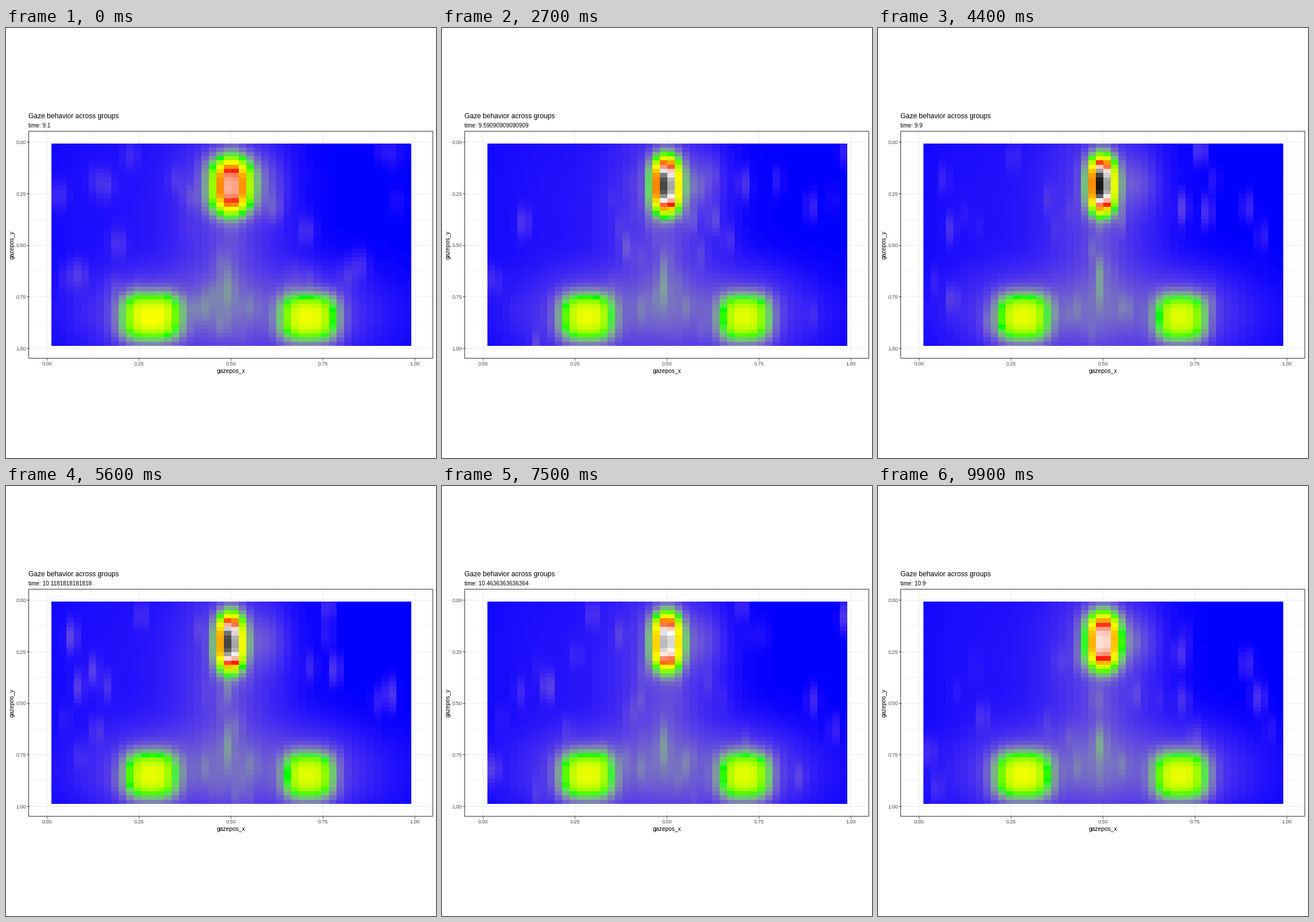
Write a matplotlib script that moves like this. It is 748 px wide and 748 px high and loops after 10 s.

```python
import numpy as np
import matplotlib.pyplot as plt
from matplotlib.animation import FuncAnimation
from matplotlib.patches import Rectangle

SIZE, DPI, FRAMES = 748, 100, 100
PX = 72 / DPI
N = 48
LEFT, RIGHT, TOP, BOTTOM = 79, 705, 201, 553
CELL = (RIGHT - LEFT) / N
START, SPAN = 9.1, 1.8

plt.rcParams["font.family"] = "Liberation Sans"

# ---- colour scale: blends in Lab space between evenly spaced stops ----
M = np.array([[0.4124, 0.3576, 0.1805],
              [0.2126, 0.7152, 0.0722],
              [0.0193, 0.1192, 0.9505]])
WHITE = M.sum(axis=1)


def to_lab(rgb):
    rgb = np.asarray(rgb, float)
    lin = np.where(rgb > 0.04045, ((rgb + 0.055) / 1.055) ** 2.4, rgb / 12.92)
    t = lin @ M.T / WHITE
    f = np.where(t > 0.008856, np.cbrt(t), 7.787 * t + 16 / 116)
    return np.stack([116 * f[:, 1] - 16, 500 * (f[:, 0] - f[:, 1]),
                     200 * (f[:, 1] - f[:, 2])], axis=1)


def to_rgb(lab):
    fy = (lab[:, 0] + 16) / 116
    f = np.stack([fy + lab[:, 1] / 500, fy, fy - lab[:, 2] / 200], axis=1)
    t = np.where(f > 0.2069, f ** 3, (f - 16 / 116) / 7.787)
    lin = np.clip((t * WHITE) @ np.linalg.inv(M).T, 0, 1)
    return np.where(lin > 0.0031308, 1.055 * lin ** (1 / 2.4) - 0.055, 12.92 * lin)


stops = to_lab([(0, 0, 1), (0, 1, 0), (1, 1, 0), (1, 0, 0), (1, 1, 1), (0, 0, 0)])
ramp = np.linspace(0, 5, 2001)
LUT = np.clip(to_rgb(np.stack([np.interp(ramp, range(6), c) for c in stops.T],
                              axis=1)), 0, 1)


def colorize(field):
    return LUT[np.rint(np.clip(field, 0, 1) * 2000).astype(int)]


# ---- density field ----
X, Y = np.meshgrid(LEFT + (np.arange(N) + 0.5) * CELL,
                   TOP + (np.arange(N) + 0.5) * (BOTTOM - TOP) / N)


def bump(x, y, sx, sy, amp):
    return amp * np.exp(-((X - x) / sx) ** 2 / 2 - ((Y - y) / sy) ** 2 / 2)


def plateau(x, y, wx, wy, amp):
    return amp * np.exp(-np.abs((X - x) / wx) ** 3 - np.abs((Y - y) / wy) ** 3)


# broad haze: left side, middle column, lower band, halos of the two lower areas
BASE = (bump(200, 300, 100, 150, 0.004) + bump(385, 330, 60, 130, 0.028)
        + bump(385, 500, 140, 48, 0.033) + bump(385, 475, 38, 38, 0.018)
        + bump(392, 390, 18, 80, 0.012) + bump(252, 495, 55, 42, 0.025)
        + bump(524, 495, 55, 42, 0.025) + bump(450, 270, 22, 30, 0.03))
# lasting ridges between the three areas
RIDGES = [(385, 450, 25, 0.045), (346, 490, 18, 0.025),
          (425, 485, 16, 0.025), (425, 270, 20, 0.02)]

# kernel width and peak over the run, as fractions of its span
PHASE = [0, 0.1, 0.27, 0.44, 0.57, 0.76, 1]
SPREAD = [1.72, 1.46, 1.2, 1.12, 1.14, 1.2, 1.4]
PEAK = [0.71, 0.80, 0.95, 1.0, 0.96, 0.88, 0.78]

# brief specks: denser on the left, in the middle and low down
rng = np.random.default_rng(7)
SPECKS = 150
speck_x = np.where(rng.random(SPECKS) < 0.4, rng.normal(385, 75, SPECKS),
                   LEFT + (RIGHT - LEFT) * rng.random(SPECKS) ** 1.2)
speck_y = rng.uniform(TOP, BOTTOM, SPECKS)
speck_t = rng.uniform(-0.1, 1.1, SPECKS)
speck_amp = rng.uniform(0.012, 0.035, SPECKS)


def density(u):
    spread, peak = np.interp(u, PHASE, SPREAD), np.interp(u, PHASE, PEAK)
    lean = 0.5 + 1.2 * np.cos(2 * np.pi * (u - 0.4))
    field = BASE + peak * np.exp(
        -((X - 391.5 + max(lean, 0)) / (spread * CELL)) ** 2 / 2
        - np.abs((Y - 274 + 4 * u) / 47) ** 3)
    width, amp = 32 + 10 * spread, 0.28 + 0.04 * spread
    field += plateau(252, 503, width, 39, amp)
    field += plateau(527, 504, width - 2, 39, amp - 0.01)
    sx = 5.4 * spread
    for x, y, sy, a in RIDGES:
        field += bump(x, y, sx, sy, a)
    fade = np.clip(1 - np.abs(u - speck_t) / 0.16, 0, 1)
    for k in np.flatnonzero(fade):
        field += bump(speck_x[k], speck_y[k], sx, 16, speck_amp[k] * fade[k])
    return field


# ---- chart, laid out in pixels ----
fig = plt.figure(figsize=(SIZE / DPI, SIZE / DPI), dpi=DPI, facecolor="white")
ax = fig.add_axes([0, 0, 1, 1])


def line(xs, ys, color, width):
    ax.plot(xs, ys, color=color, lw=width * PX, zorder=1, solid_capstyle="butt")


def label(x, y, s, px, color="black", **kw):
    return ax.text(x, y, s, fontsize=px * PX, color=color, **kw)


def at_x(v):
    return 71.5 + 639.5 * v


def at_y(v):
    return 198.2 + 359 * v


for v in np.arange(0.125, 1, 0.25):
    line([at_x(v)] * 2, [179, 575], "#EBEBEB", 0.6)
    line([40, 743], [at_y(v)] * 2, "#EBEBEB", 0.6)
for v in np.linspace(0, 1, 5):
    line([at_x(v)] * 2, [179, 575], "#EBEBEB", 1)
    line([40, 743], [at_y(v)] * 2, "#EBEBEB", 1)
    line([at_x(v)] * 2, [575, 578], "#333333", 1)
    line([36, 40], [at_y(v)] * 2, "#333333", 1)
    label(at_x(v), 587, f"{v:.2f}", 9, "#4D4D4D", ha="center")
    label(35, at_y(v) + 3.6, f"{v:.2f}", 9, "#4D4D4D", ha="right")

heat = ax.imshow(colorize(density(0)), interpolation="nearest", aspect="auto",
                 extent=(LEFT + 0.02, RIGHT - 0.02, BOTTOM - 0.02, TOP + 0.02),
                 zorder=2)
ax.add_patch(Rectangle((39.5, 179.5), 703, 395, fill=False, ec="#333333",
                       lw=PX, zorder=3, snap=False))

label(39, 157, "Gaze behavior across groups", 12)
subtitle = label(39, 173, "", 10)
label(391, 600, "gazepos_x", 10.3, ha="center")
label(16, 377, "gazepos_y", 10.3, ha="right", va="center", rotation=90)

ax.set_xlim(0, SIZE)
ax.set_ylim(SIZE, 0)
ax.axis("off")


def update(i):
    u = i / (FRAMES - 1)
    heat.set_data(colorize(density(u)))
    subtitle.set_text(f"time: {START + SPAN * u:.15g}")
    return heat, subtitle


anim = FuncAnimation(fig, update, frames=FRAMES, interval=100, repeat=True,
                     repeat_delay=0, blit=False)
plt.show()
```
